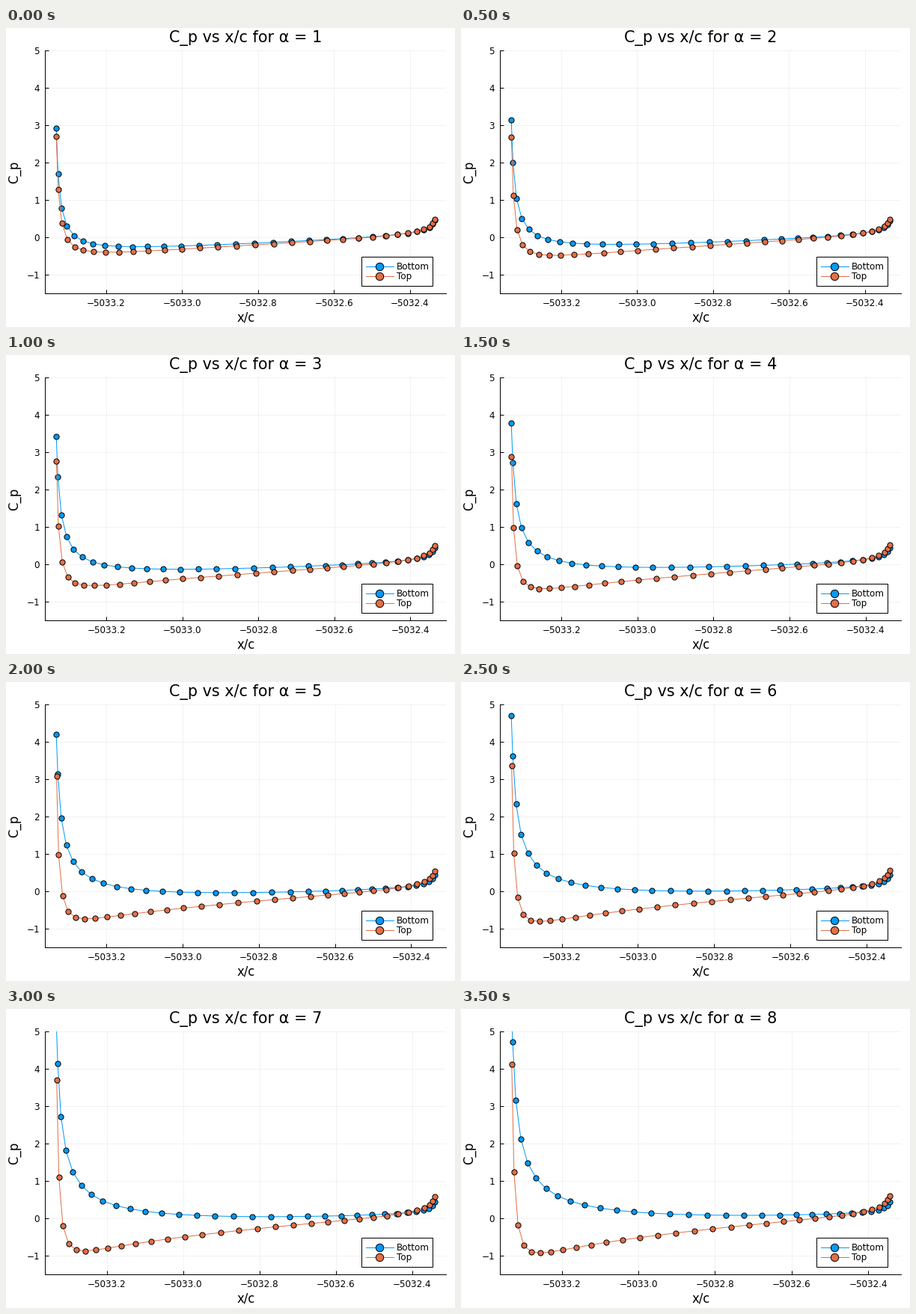
These frames come from a looping animation (600x400 px, 4 s). A matplotlib script:

```python
import numpy as np
import matplotlib.pyplot as plt
from matplotlib.animation import FuncAnimation
from matplotlib.lines import Line2D
from matplotlib.patches import Rectangle
from matplotlib.transforms import Affine2D

W, H, DPI = 600, 400, 100
PX = 72 / DPI  # one pixel in points
BLUE, ORANGE = "#009AFA", "#E36F47"
PANELS = 32
NOSE_X = -5033.333
NOSE_Q = 0.0085  # softens the leading-edge singularity

plt.rcParams["font.family"] = "DejaVu Sans"


def midpoints(edges):
    return (edges[1:] + edges[:-1]) / 2


# Symmetric 12 % thick profile with cosine-spaced panels
edge_x = (1 - np.cos(np.linspace(0, np.pi, PANELS + 1))) / 2
edge_y = 0.6 * (0.2969 * np.sqrt(edge_x) - 0.126 * edge_x - 0.3516 * edge_x**2
                + 0.2843 * edge_x**3 - 0.1015 * edge_x**4)
x, y = midpoints(edge_x), midpoints(edge_y)

# Pressure is base -/+ lift * alpha + curve * alpha^2, alpha in degrees
base = (0.543 * x - 0.48
        + 1 / (0.258 + 41 * x + 280 * x**2)
        + 0.505 * np.exp(-6.8 * np.sqrt(1 - x)))
lift = (np.sqrt(x) / (x + NOSE_Q) * (1 - np.exp(-1200 * x))
        * (0.041 - 0.05 * x + 0.008 * x**2 - 0.0095 * x**20))
curve = 1e-4 * (3.4 + 8 * x**1.2 - 2.5 * x**4) / (x + NOSE_Q)


def surface(alpha, side):
    """Panel positions and pressures; side is 1 for top, -1 for bottom."""
    a = np.radians(alpha)
    pos = NOSE_X + x * np.cos(a) + side * y * np.sin(a)
    return pos, base - side * lift * alpha + curve * alpha**2


fig = plt.figure(figsize=(W / DPI, H / DPI), dpi=DPI, facecolor="white")
ax = fig.add_axes([52 / W, 1 - 355 / H, 536 / W, 325 / H])
pixels = Affine2D().scale(1 / W, -1 / H).translate(0, 1) + fig.transFigure


def label(px, py, text, size, **kw):
    return fig.text(px, py, text, transform=pixels, fontsize=size * PX,
                    va="baseline", **kw)


def style(color, marker):
    return dict(color=color, lw=PX, marker="o", ms=marker * PX,
                mfc=color, mec="black", mew=PX)


def tick_text(value, digits):
    return f"{value:.{digits}f}".replace("-", "−")


ax.set_ylim(-1.5, 5)
x_ticks = np.arange(5) * 0.2 - 5033.2
y_ticks = range(-1, 6)
ax.set_xticks(x_ticks, [tick_text(t, 1) for t in x_ticks])
ax.set_yticks(y_ticks, [tick_text(t, 0) for t in y_ticks])
ax.tick_params(direction="in", length=5.4 * PX, width=PX, labelsize=12 * PX)
ax.tick_params(axis="x", pad=6.5 * PX)
ax.tick_params(axis="y", pad=7 * PX)
ax.grid(color="black", alpha=0.05, lw=PX)
ax.set_axisbelow(True)
for name, spine in ax.spines.items():
    spine.set_linewidth(PX)
    spine.set_visible(name in ("left", "bottom"))

bottom, = ax.plot([], [], snap=False, **style(BLUE, 7.2))
top, = ax.plot([], [], snap=False, **style(ORANGE, 7.2))

title = label(218, 18.5, "", 20.8)
label(320.5, 392, "x/c", 16.5, ha="center")
label(15.6, 192.5, "C_p", 16.5, rotation=90, rotation_mode="anchor", ha="center")

# Legend
fig.add_artist(Rectangle((475, 306), 95, 39, transform=pixels,
                         fc="white", ec="black", lw=PX))
for row, color, text in ((319, BLUE, "Bottom"), (332, ORANGE, "Top")):
    fig.add_artist(Line2D([481, 518], [row, row], transform=pixels, color=color, lw=PX))
    fig.add_artist(Line2D([499], [row], transform=pixels, **style(color, 10.4)))
    label(522, row + 4.4, text, 12)


def draw(frame):
    alpha = frame + 1
    title.set_text(f"C_p vs x/c for α = {alpha}")
    low, high = surface(alpha, -1), surface(alpha, 1)
    bottom.set_data(*low)
    top.set_data(*high)
    xs = np.concatenate([low[0], high[0]])
    margin = 0.03 * np.ptp(xs)
    ax.set_xlim(xs.min() - margin, xs.max() + margin)
    return bottom, top, title


anim = FuncAnimation(fig, draw, frames=8, interval=500, repeat=True,
                     repeat_delay=0, init_func=lambda: draw(0))
plt.show()
```
